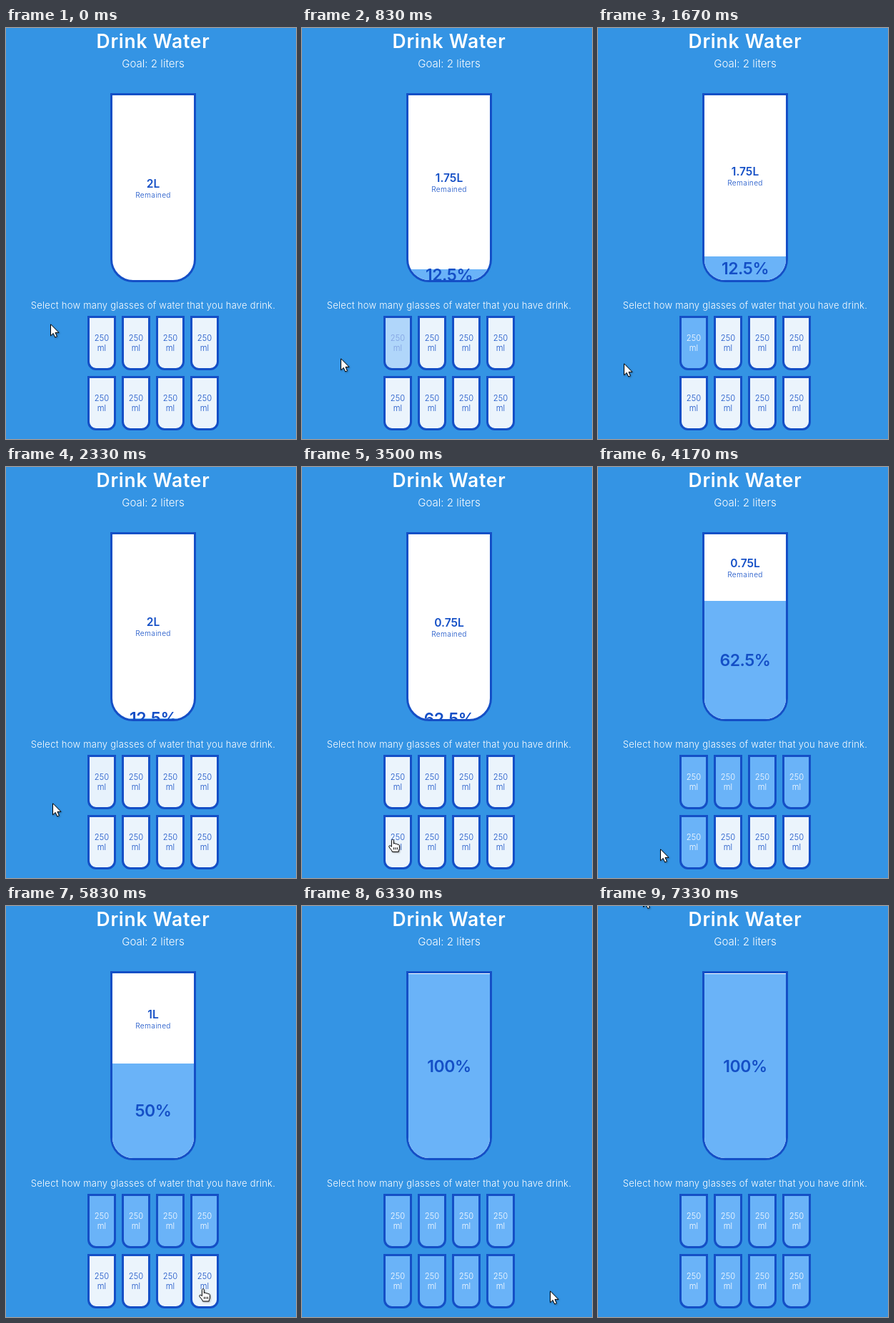
Write an HTML page that moves like this. It is 406 px wide and 574 px high and loops after 7.49 s.

```html
<!DOCTYPE html>
<html lang="en">
<head>
<meta charset="utf-8">
<title>Drink Water</title>
<style>
  :root { --line: #144fc6; --fill: #6ab3f8; }
  * { box-sizing: border-box; }
  html, body { margin: 0; width: 100%; height: 100%; overflow: hidden; background: #3494e4; }
  body { font-family: Inter, "Open Sans", sans-serif; font-weight: 350; color: #fff; }
  #stage { position: absolute; left: 0; top: 0; width: 406px; height: 574px; overflow: hidden; }
  .line { position: absolute; left: 6px; width: 400px; height: 30px; line-height: 30px;
    text-align: center; white-space: nowrap; }
  .title { top: 3px; font-size: 26.4px; font-weight: 600; letter-spacing: .03em; }
  .goal { top: 35px; font-size: 15.1px; }
  .hint { top: 372px; font-size: 13px; letter-spacing: .02em; }
  .cup, .glass { position: absolute; border: 3px solid var(--line); color: var(--line); }
  .cup { left: 146px; top: 91px; width: 120px; height: 264px; overflow: hidden;
    background: #fff; border-radius: 0 0 32px 32px; text-align: center; }
  #left { position: absolute; left: 0; width: 100%; height: 32px; }
  #left b { display: block; font-size: 15.6px; line-height: 18px; font-weight: 600; }
  #left span { display: block; font-size: 10.2px; line-height: 13px; letter-spacing: .03em; }
  #water { position: absolute; left: 0; bottom: 0; width: 100%; background: var(--fill); }
  #percent { position: absolute; left: 0; top: 50%; width: 100%; height: 30px; margin-top: -15px;
    line-height: 30px; font-size: 23px; font-weight: 600; letter-spacing: -.02em; }
  .glass { width: 40px; height: 76px; border-radius: 0 0 12px 12px; padding-top: 21px;
    font-size: 11.2px; line-height: 14px; text-align: center; }
  #pointer { position: absolute; left: 0; top: 0; width: 22px; height: 24px; overflow: visible;
    filter: drop-shadow(1px 1px 1px rgba(0, 0, 0, .3)); }
  #pointer path { fill: #fff; stroke: #000; stroke-linejoin: round; }
</style>
</head>
<body>
<div id="stage">
  <div class="line title">Drink Water</div>
  <div class="line goal">Goal: 2 liters</div>
  <div class="cup">
    <div id="left"><b id="liters">2L</b><span>Remained</span></div>
    <div id="water"><div id="percent"></div></div>
  </div>
  <div class="line hint">Select how many glasses of water that you have drink.</div>
  <svg id="pointer" viewBox="0 0 22 24">
    <path id="arrow" d="M.5.8V16.8L4.2 13.4 6.7 19 9.4 17.8 7 12.4H12Z"/>
    <g id="hand" transform="translate(-5)">
      <path d="M4.4 10.8V2.2C4.4.2 7.3.2 7.3 2.2V6.7C8 5.7 10 5.9 10.1 7.2 10.9 6.4 12.7 6.7 12.8 8
        13.7 7.4 15.4 7.8 15.4 9.4V13C15.4 14.6 14.2 15.6 14.2 18H5.4C5.2 15.8 2.8 14.1 1 11.3
        .1 9.6 2 8.5 3.2 9.7Z"/>
      <path d="M7.6 11.8V14.8M10 11.8V14.8M12.4 11.8V14.8"/>
    </g>
  </svg>
</div>
<script>
const LOOP = 7490, FADE = 300, STEP = 1000 / 6;
const $ = id => document.getElementById(id);
const mix = (a, b, p) => a + (b - a) * p;
const mixColor = (a, b, p) => `rgb(${a.map((v, i) => Math.round(mix(v, b[i], p)))})`;
const lastAt = (list, t) => list.findLastIndex(e => e[0] <= t);
const EMPTY = [235, 244, 252], FULL = [106, 179, 248], INK = [20, 79, 198], WHITE = [255, 255, 255];

// Clicks: time in ms, number of filled glasses
const clicks = [[-FADE, 0], [752, 1], [2103, 0], [3500, 5], [5400, 4], [6000, 8]];

// Pointer path: step, x, y; it rests at a point unless it glides to the next
const GLIDE = true;
const path = [
  [0, 62, 413, GLIDE], [3, 122, 436], [5, 54, 461], [7, 42, 468, GLIDE], [11, 34, 468],
  [13, 122, 455], [14, 65, 469, GLIDE], [19, 126, 526, GLIDE], [21, 126, 519.5],
  [22, 72, 528], [23, 44, 531, GLIDE], [25, 87, 533], [35, 275, 534],
  [38, 347, 537], [40, 210, 318], [42, 71, 160], [44, 63, -15.5]
];

const glasses = Array.from({ length: 8 }, (_, i) => {
  const el = document.createElement('div');
  const x = 114 + i % 4 * 48, y = 402 + (i >> 2) * 84;
  el.className = 'glass';
  el.style.left = x + 'px';
  el.style.top = y + 'px';
  el.innerHTML = '250<br>ml';
  $('pointer').before(el);
  return { el, x, y };
});

// The CSS "ease" curve, solved by bisection
function ease(x) {
  if (x >= 1) return 1;
  let lo = 0, hi = 1;
  for (let i = 0; i < 24; i++) {
    const s = (lo + hi) / 2;
    if (.75 * s * (1 - s) + s ** 3 < x) lo = s; else hi = s;
  }
  const r = 1 - lo;
  return .3 * r * r * lo + 3 * r * lo * lo + lo ** 3;
}

const level = n => Math.min(n * 33, 257);

function drawWater(time) {
  const k = lastAt(clicks, time);
  const now = clicks[k][1], was = k ? clicks[k - 1][1] : 0;
  const p = ease((time - clicks[k][0]) / FADE);
  const h = mix(level(was), level(now), p);

  $('water').style.height = h + 'px';
  $('water').style.visibility = now || p < 1 ? 'visible' : 'hidden';
  $('percent').textContent = (now || was) * 12.5 + '%';
  $('liters').textContent = 2 - now / 4 + 'L';
  $('left').style.visibility = now < 8 ? 'visible' : 'hidden';
  $('left').style.top = (258 - h) / 2 - 14.5 + 'px';

  glasses.forEach(({ el }, i) => {
    const f = mix(+(i < was), +(i < now), p);
    el.style.background = mixColor(EMPTY, FULL, f);
    el.style.color = mixColor(INK, WHITE, f);
  });
}

function drawPointer(step) {
  const k = lastAt(path, step);
  const [from, x0, y0, glide] = path[k];
  const [to, x1, y1] = path[k + 1] || path[k];
  const p = glide ? (step - from) / (to - from) : 0;
  const x = mix(x0, x1, p), y = mix(y0, y1, p);
  const over = glasses.some(g => x >= g.x && x < g.x + 40 && y >= g.y && y < g.y + 76);

  $('pointer').style.transform = `translate(${x}px, ${y}px)`;
  $('hand').style.display = over ? '' : 'none';
  $('arrow').style.display = over ? 'none' : '';
}

const start = performance.now();
function tick() {
  const t = (performance.now() - start) % LOOP;
  const step = Math.floor((t + 4) / STEP); // the picture changes six times a second
  drawWater(step * STEP);
  drawPointer(step);
  requestAnimationFrame(tick);
}
tick();
</script>
</body>
</html>
```
